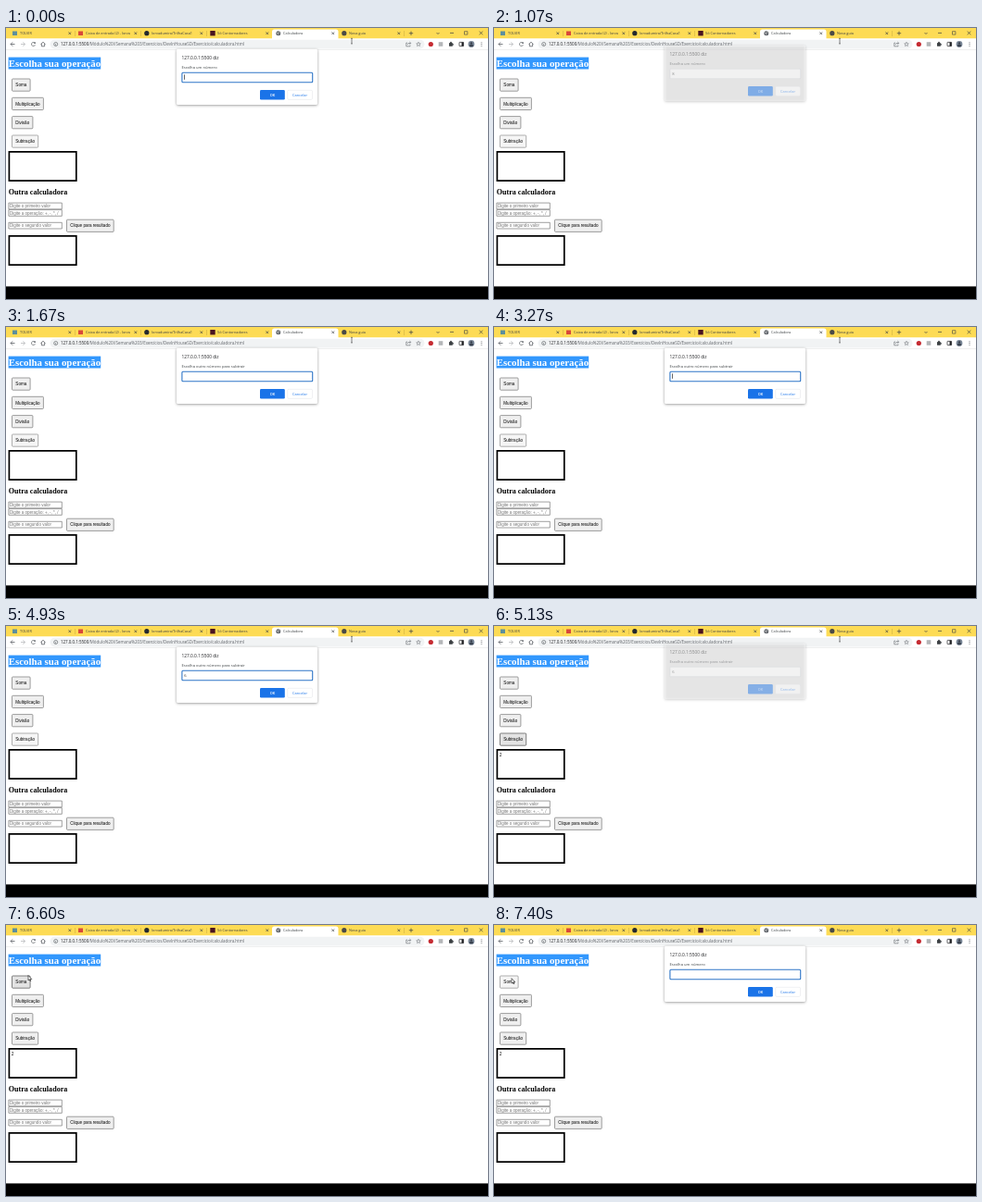
An HTML page with a canvas for the animation above (8000 ms loop, 520 by 293 pixels).

```html
<!DOCTYPE html>
<html lang="pt">
<head>
<meta charset="utf-8">
<title>Calculadora</title>
<style>
  html, body { margin: 0; width: 100%; height: 100%; overflow: hidden; background: #fff; }
  canvas { display: block; width: 520px; height: 293px; }
</style>
</head>
<body>
<canvas id="stage" width="520" height="293"></canvas>
<script>
const ctx = document.getElementById('stage').getContext('2d');
const LOOP = 8000;
const STEP = 200 / 3;
const UI = '"Open Sans", sans-serif';
const ARIAL = '"Liberation Sans", Arial, sans-serif';
const TIMES = '"Liberation Serif", serif';
const BLUE = '#1a73e8';
const YELLOW = '#fddb55';
const INK = '#3c4043';

function rect(x, y, w, h, fill) {
  ctx.fillStyle = fill;
  ctx.fillRect(x, y, w, h);
}

function box(x, y, w, h, r, fill, stroke, width = 0.6) {
  ctx.beginPath();
  ctx.roundRect(x, y, w, h, r);
  if (fill) { ctx.fillStyle = fill; ctx.fill(); }
  if (stroke) { ctx.strokeStyle = stroke; ctx.lineWidth = width; ctx.stroke(); }
}

function dot(x, y, r, fill) {
  ctx.beginPath();
  ctx.arc(x, y, r, 0, 2 * Math.PI);
  ctx.fillStyle = fill;
  ctx.fill();
}

function ring(x, y, r, stroke, from = 0, to = 2 * Math.PI) {
  ctx.beginPath();
  ctx.arc(x, y, r, from, to);
  ctx.strokeStyle = stroke;
  ctx.lineWidth = 0.7;
  ctx.stroke();
}

// Each path is a flat list of x, y pairs.
function lines(stroke, width, ...paths) {
  ctx.beginPath();
  for (const p of paths) {
    ctx.moveTo(p[0], p[1]);
    for (let i = 2; i < p.length; i += 2) ctx.lineTo(p[i], p[i + 1]);
  }
  ctx.strokeStyle = stroke;
  ctx.lineWidth = width;
  ctx.stroke();
}

function text(str, x, y, font, fill, align = 'left') {
  ctx.font = font;
  ctx.fillStyle = fill;
  ctx.textAlign = align;
  ctx.fillText(str, x, y);
}

function clippedText(str, x, y, w, font, fill) {
  ctx.save();
  ctx.beginPath();
  ctx.rect(x, y - 6, w, 9);
  ctx.clip();
  text(str, x, y, font, fill);
  ctx.restore();
}

function cross(x, y, r, color) {
  lines(color, 0.7, [x - r, y - r, x + r, y + r], [x - r, y + r, x + r, y - r]);
}

function drawTabs() {
  rect(0, 0, 520, 11.5, YELLOW);
  box(287, 1.6, 71.5, 13, 2.5, '#fff');
  const titles = ['TOLVIR', 'Caixa de entrada (2) - lorva', 'lorvadumira/TrilhaCasa1',
    'Só Contornadores', 'Calculadora', 'Nova guia'];
  titles.forEach((title, i) => {
    const x = 9.5 + i * 71;
    clippedText(title, x + 5.6, 7.1, 49, `3.85px ${UI}`, INK);
    cross(x + 59.3, 5.7, 1.3, INK);
    if (i < 3 || i === 5) rect(x + 65, 3, 0.4, 6, '#b99d3a');
  });
  rect(7, 3.5, 5, 4.5, '#5d8f9c');
  rect(78, 3.5, 5, 4.5, '#d9483b');
  dot(151.8, 5.7, 2.6, '#24292e');
  rect(220.3, 3, 5.4, 5.4, '#4a1420');
  dot(293.8, 5.7, 2.5, '#5f6368');
  lines('#fff', 0.5, [291.7, 5, 294, 5.6, 293.4, 7.4], [294, 3.8, 295.6, 5.2]);
  dot(364.8, 5.7, 2.6, '#4a4a46');

  lines(INK, 0.7, [434.8, 5.7, 439.2, 5.7], [437, 3.5, 437, 7.9],
    [464.5, 5, 466, 6.5, 467.5, 5], [479, 5.4, 483, 5.4]);
  box(494.5, 3.7, 3.4, 3.4, 0, null, INK);
  cross(512.5, 5.4, 1.8, INK);
}

function drawToolbar() {
  rect(0, 11.5, 520, 12, '#fff');
  rect(0, 23.3, 520, 0.5, '#dedfe1');
  lines('#5f6368', 0.8, [9.5, 17.5, 5, 17.5], [7.2, 15.3, 5, 17.5, 7.2, 19.7]);
  lines('#babcbe', 0.8, [16, 17.5, 20.5, 17.5], [18.3, 15.3, 20.5, 17.5, 18.3, 19.7]);
  ring(29.5, 17.5, 2, '#5f6368', 0.3, 5.6);
  rect(30.3, 15.4, 1.6, 1.5, '#5f6368');
  lines('#5f6368', 0.8, [37.5, 17.6, 40, 15.2, 42.5, 17.6], [38.4, 17, 38.4, 19.8, 41.6, 19.8, 41.6, 17]);

  box(47.5, 12.8, 404, 9.6, 4.8, '#f1f3f4');
  ring(53.7, 17.5, 2, '#5f6368');
  rect(53.4, 17.1, 0.6, 1.6, '#5f6368');
  const host = '127.0.0.1:5500';
  const font = `4.47px ${UI}`;
  text(host, 59, 19.1, font, '#202124');
  text('/Módulo%20I/Semana%203/Exercícios/DevInHouseSD/Exercicio/calculadora.html',
    59 + ctx.measureText(host).width, 19.1, font, '#5f6368');

  lines('#5f6368', 0.6, [433, 16, 431.8, 16, 431.8, 19.8, 436, 19.8, 436, 18.6],
    [433, 18, 434, 16.6, 436.5, 16.4], [435.4, 15, 436.8, 16.4, 435.4, 17.8]);
  ctx.beginPath();
  for (let i = 0; i < 10; i++) {
    const r = i % 2 ? 1.1 : 2.4, a = i * Math.PI / 5 - Math.PI / 2;
    ctx.lineTo(445 + r * Math.cos(a), 17.6 + r * Math.sin(a));
  }
  ctx.closePath();
  ctx.strokeStyle = '#5f6368';
  ctx.lineWidth = 0.5;
  ctx.stroke();

  dot(458.3, 17.5, 2.6, '#c52b32');
  rect(466.7, 15.2, 4.6, 4.6, '#b4b6b8');
  box(478, 16, 3.8, 3.8, 0.5, INK);
  dot(480, 15.6, 0.9, INK);
  dot(482, 17.8, 0.9, INK);
  box(489, 15.4, 4.6, 4.2, 0.4, null, '#202124', 0.7);
  rect(491.5, 15.4, 2.1, 4.2, '#202124');
  dot(502, 17.4, 3.4, '#7a8797');
  dot(502, 16.4, 1.2, '#39414e');
  box(500, 17.8, 4, 2.4, 1.2, '#39414e');
  for (const y of [15.7, 17.5, 19.3]) dot(513, y, 0.55, '#5f6368');
}

const LOOK = {
  normal: ['#efefef', '#767676'],
  hover: ['#e3e3e3', '#4f4f4f'],
  active: ['#f5f5f5', '#8d8d8d'],
};

function button(label, x, y, w, look = 'normal') {
  const [fill, stroke] = LOOK[look];
  box(x, y, w, 13.2, 0.9, fill, stroke, 0.7);
  text(label, x + w / 2, y + 8.2, `4.55px ${ARIAL}`, '#000', 'center');
}

function field(hint, y) {
  box(2.9, y, 57.4, 6.7, 0, '#fff', '#767676', 0.7);
  clippedText(hint, 4, y + 4.9, 55, `4.52px ${ARIAL}`, '#757575');
}

function drawPage(t) {
  rect(2.6, 31.6, 99.6, 12.9, '#3297fd');
  text('Escolha sua operação', 2.7, 41.7, `bold 10.85px ${TIMES}`, '#fff');

  const soma = t >= 6800 ? 'active' : t >= 6460 ? 'hover' : 'normal';
  const subtract = t < 5070 ? 'active' : t < 5730 ? 'hover' : 'normal';
  button('Soma', 6.5, 55, 19.6, soma);
  button('Multiplicação', 6.5, 75.3, 33.9);
  button('Divisão', 6.5, 95.6, 22.4);
  button('Subtração', 6.5, 116, 28.2, subtract);

  box(3.4, 133.8, 72.4, 31.4, 0, null, '#000', 1.7);
  if (t >= 5130) text('2', 5.7, 140.9, `5.4px ${TIMES}`, '#000');

  text('Outra calculadora', 2.7, 180.2, `bold 8.1px ${TIMES}`, '#000');
  field('Digite o primeiro valor', 189.1);
  field('Digite a operação: +, -, *, /', 196.6);
  field('Digite o segundo valor', 210.3);
  button('Clique para resultado', 65.5, 207.2, 50.7);
  box(3.4, 224.8, 72.4, 31.4, 0, null, '#000', 1.7);
  rect(0, 279.4, 520, 13.6, '#000');
}

function drawPrompt({ message, typed, caret, alpha, lift }) {
  ctx.save();
  ctx.globalAlpha = alpha;
  ctx.translate(0, -lift);

  ctx.save();
  ctx.shadowColor = 'rgba(0,0,0,0.42)';
  ctx.shadowBlur = 3;
  ctx.shadowOffsetY = 0.6;
  box(184, 22.8, 152, 60.3, 1.4, '#fff');
  ctx.restore();

  text('127.0.0.1:5500 diz', 189.4, 34, `4.8px ${UI}`, '#202124');
  text(message, 189.4, 43.7, `4.12px ${UI}`, '#3c4043');
  const edge = alpha < 0.6 ? '#d5d8dc' : '#2f76c7';
  box(189.9, 48.3, 140.8, 10.4, 1, '#fff', edge, 1.1);
  text(typed, 192.2, 55, `4.12px ${UI}`, '#202124');
  if (caret) rect(typed ? 195 : 192.2, 50.4, 0.6, 5.4, '#000');

  box(274, 67.1, 26.8, 10.5, 1.3, BLUE);
  text('OK', 287.4, 73.8, `600 3.9px ${UI}`, '#fff', 'center');
  box(303.7, 67.3, 26.8, 10.1, 1.3, '#fff', '#dadce0', 0.4);
  text('Cancelar', 317, 73.8, `3.95px ${UI}`, BLUE, 'center');
  ctx.restore();
}

const FIRST = 'Escolha um número';
const SECOND = 'Escolha outro número para subtrair';
const blinkOn = (t, start) => Math.floor((t - start) / 533.4) % 2 === 0;

// Opacity and upward offset change in discrete steps while a prompt opens or closes.
function promptAt(t) {
  const state = (message, typed, caret, alpha = 1, lift = 0) => ({ message, typed, caret, alpha, lift });
  if (t < 530) return state(FIRST, '', true);
  if (t < 670) return state(FIRST, '', false);
  if (t < 1070) return state(FIRST, '8', true);
  if (t < 1130) return state(FIRST, '8', false, 0.5, 4);
  if (t < 1200) return state(SECOND, '', true, 0.55, 4);
  if (t < 1270) return state(SECOND, '', true, 0.96, 2.2);
  if (t < 4270) return state(SECOND, '', blinkOn(t, 1135));
  if (t < 4800) return state(SECOND, '6', true);
  if (t < 5070) return state(SECOND, '6', false);
  if (t < 5130) return state(SECOND, '6', false, 0.85, 2);
  if (t < 5200) return state(SECOND, '6', false, 0.47, 4);
  if (t < 6870) return null;
  if (t < 6930) return state(FIRST, '', true, 0.5, 4);
  if (t < 7000) return state(FIRST, '', true, 0.95, 2.2);
  return state(FIRST, '', t < 7400);
}

function pointerAt(t) {
  const now = Math.floor((t + 5) / STEP) * STEP;
  const progress = (from, to) => Math.min(1, Math.max(0, (now - from) / (to - from)));
  const u = progress(5600, 6530), e = u * u * (3 - 2 * u);
  const v = progress(6600, 6733);
  return {
    x: 373 + (24 - 373) * e - 5 * v,
    y: 14 + 40.5 * e + 24 * e * (1 - e) + 3.2 * v,
  };
}

function drawPointer({ x, y }) {
  if (y < 23) {
    lines('#333', 0.6, [x, y - 2.4, x, y + 2.6], [x - 1, y - 2.7, x + 1, y - 2.7], [x - 1, y + 2.9, x + 1, y + 2.9]);
    return;
  }
  ctx.beginPath();
  const shape = [0, 0, 0, 5.4, 1.2, 4.3, 2, 6.1, 2.9, 5.7, 2.1, 4, 3.8, 4];
  for (let i = 0; i < shape.length; i += 2) ctx.lineTo(x + shape[i], y + shape[i + 1]);
  ctx.closePath();
  ctx.fillStyle = '#fff';
  ctx.fill();
  ctx.strokeStyle = '#000';
  ctx.lineWidth = 0.55;
  ctx.stroke();
}

function draw(t) {
  rect(0, 0, 520, 293, '#fff');
  drawTabs();
  drawToolbar();
  drawPage(t);
  const prompt = promptAt(t);
  if (prompt) drawPrompt(prompt);
  drawPointer(pointerAt(t));
}

const start = performance.now();
function tick() {
  draw((performance.now() - start) % LOOP);
  requestAnimationFrame(tick);
}
tick();
</script>
</body>
</html>
```
